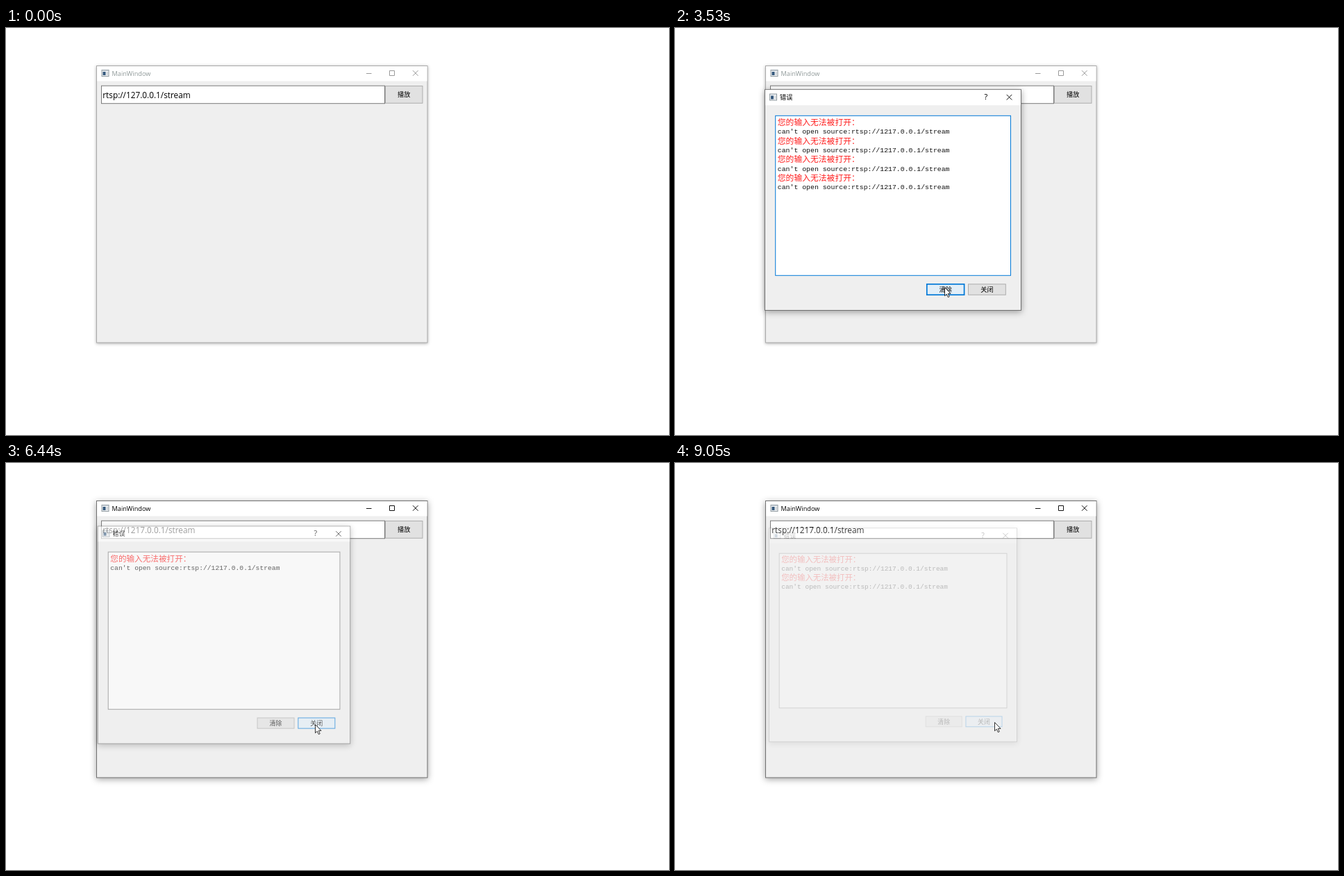
Recreate the animation shown at these times as an HTML page. Size 955 by 586 pixels, loop 9120 ms.

```html
<!DOCTYPE html>
<html lang="zh">
<head>
<meta charset="utf-8">
<style>
html, body { margin: 0; width: 100%; height: 100%; overflow: hidden; background: #fff; }
svg { display: block; width: 955px; height: 586px; }
text { font-family: "Noto Sans CJK SC", "Noto Sans CJK", sans-serif; font-size: 9.2px; white-space: pre; }
.latin { font-family: "Open Sans", "Noto Sans", sans-serif; }
.url { font-size: 11.8px; }
.log { font-family: "Liberation Mono", monospace; font-size: 9.84px; fill: #111; }
.warn { font-family: "Noto Sans CJK SC", "Noto Sans CJK", sans-serif; font-size: 11.8px; font-weight: 300; fill: #ff2020; }
.frame { fill: #efefef; stroke: #aaa; filter: drop-shadow(0 1px 2px rgba(0,0,0,.32)); }
.active .frame { stroke: #707070; filter: drop-shadow(0 2px 5px rgba(0,0,0,.36)); }
.title { fill: #8f9999; }
.glyphs { fill: none; stroke: #999; }
.active .title { fill: #000; }
.active .glyphs { stroke: #111; }
.field { fill: #fff; stroke: #7a7a7a; }
.field.hover { stroke: #171717; }
.field.focus { stroke: #0078d7; }
.button rect { fill: #e1e1e1; stroke: #adadad; }
.button text { text-anchor: middle; }
.button.default rect { stroke: #0078d7; stroke-width: 1.7; }
.button.hover rect { fill: #e1eef8; stroke: #0078d7; }
.button.pressed rect { fill: #cce4f7; stroke: #005499; }
.button.fading rect { fill: #dce1e7; stroke: #8e9fb0; }
</style>
</head>
<body>
<svg viewBox="0 0 955 586">
  <defs>
    <g id="icon">
      <rect x=".5" y=".5" width="10" height="9" fill="#f4f6f8" stroke="#8d979d"/>
      <path d="M1 1.2h9" stroke="#b9c3ca"/>
      <rect x="2" y="3" width="4" height="5" fill="#35587c"/>
      <rect x="7" y="3" width="2.5" height="5" fill="#d5dade"/>
    </g>
  </defs>
  <g id="main">
    <rect class="frame" x="130.5" y="54.5" width="476.5" height="398.5"/>
    <rect x="131" y="55" width="475.5" height="21.5" fill="#fff"/>
    <use href="#icon" x="137.5" y="60"/>
    <text class="title latin" x="152.5" y="68.5">MainWindow</text>
    <path class="glyphs" d="M519 65.5h7.5M552.5 61.5h7v7h-7zM586 61.2l7.6 7.6M593.6 61.2l-7.6 7.6"/>
    <rect id="field" class="field" x="137.5" y="83.2" width="408" height="25.5"/>
    <text id="url" class="latin url" x="139.3" y="101"></text>
    <path id="caret" d="M194.3 89v15.5" stroke="#000"/>
  </g>
  <g id="dialog" class="active">
    <rect class="frame" x="129.5" y="88.7" width="369" height="317.8"/>
    <rect x="130" y="89.2" width="368" height="22" fill="#fff"/>
    <use href="#icon" x="136" y="94.5"/>
    <text class="title" x="151" y="103.2">错误</text>
    <text class="title latin" x="445.6" y="103.3" style="font-size:11px">?</text>
    <path class="glyphs" d="M477.7 95.9l7.6 7.6M485.3 95.9l-7.6 7.6"/>
    <rect id="area" class="field" x="144.7" y="126.3" width="338.8" height="230"/>
    <g id="log"></g>
  </g>
  <circle id="click" r="8.5" fill="#f4f12c" opacity=".68"/>
  <g id="cursor">
    <path id="arrow" d="M.5.5V12.7L3.3 10.2 5.3 14.6 7.2 13.8 5.3 9.4H9z" fill="#fff" stroke="#111" stroke-width=".85"/>
    <path id="beam" d="M-2.5-7h2L0-6.5.5-7h2M0-6.5v13M-2.5 7h2L0 6.5.5 7h2" fill="none" stroke="#111" stroke-width=".9"/>
  </g>
</svg>
<script>
const LOOP = 9120, STEP = 70;
const $ = id => document.getElementById(id);

function add(parent, tag, attrs, content = '') {
  const node = document.createElementNS('http://www.w3.org/2000/svg', tag);
  for (const name in attrs) node.setAttribute(name, attrs[name]);
  node.textContent = content;
  return parent.appendChild(node);
}

function makeButton(parent, label, x, y, width, height) {
  const node = add(parent, 'g', { class: 'button' });
  add(node, 'rect', { x, y, width, height });
  add(node, 'text', { x: x + width / 2, y: y + height / 2 + 3.5 }, label);
  const contains = p => p.x > x && p.x < x + width && p.y > y && p.y < y + height;
  return { node, contains };
}

const play = makeButton($('main'), '播放', 546.5, 83.5, 53.5, 24.7);
const clear = makeButton($('dialog'), '清除', 362.8, 368.8, 53.8, 15.4);
const shut = makeButton($('dialog'), '关闭', 422.5, 368.8, 53.8, 15.4);

const entries = Array.from({ length: 4 }, (_, i) => {
  const entry = add($('log'), 'g', {});
  add(entry, 'text', { class: 'warn', x: 147.8, y: 140 + i * 26.6 }, '您的输入无法被打开：');
  add(entry, 'text', { class: 'log', x: 147.8, y: 152.3 + i * 26.6 }, "can't open source:rtsp://1217.0.0.1/stream");
  return entry;
});

const starts = [0, 130, 1170, 1790, 2140, 3120, 4080, 5050, 5970, 6930, 7130, 7890, 8840];
const presses = [1170, 2210, 3540, 4570, 5190, 6250, 6860, 8840];
const sessions = [
  { open: 2490, close: 4710, errors: 4, blur: 3540 },
  { open: 5470, close: 6390, errors: 1, blur: 6250 },
  { open: 7200, close: 8980, errors: 2, blur: 8840 }
];
const CLEARED = 3610, TYPED = 1500;
const path = [
  [130, 786, 526], [900, 188, 98], [1520, 188, 98], [1790, 497, 126],
  [2070, 570, 98], [2420, 570, 98], [2560, 564, 134], [3050, 430, 345],
  [3400, 388, 373], [4080, 388, 373], [4430, 445, 378], [4710, 445, 378],
  [5050, 566, 97], [5400, 566, 97], [5540, 560, 146], [5900, 446, 370],
  [6250, 445, 376], [6400, 445, 376], [6790, 566, 98], [7000, 566, 98],
  [7130, 561, 119], [7600, 480, 300], [8510, 460, 373], [LOOP, 460, 373]
];

function snap(t) {
  const start = starts.findLast(s => s <= t);
  return start ? start + Math.floor((t - start) / STEP) * STEP : 0;
}

function cursorAt(t) {
  const i = Math.max(1, path.findIndex(key => key[0] > t));
  const [t0, x0, y0] = path[i - 1], [t1, x1, y1] = path[i];
  const u = Math.max(0, (t - t0) / (t1 - t0)), k = u * u * (3 - 2 * u);
  return { x: x0 + (x1 - x0) * k, y: y0 + (y1 - y0) * k };
}

// Opacity and scale while the dialog pops up or fades away.
function dialogPose(t, { open, close }) {
  const rising = [[.4, .965], [.8, .99]][(t - open) / STEP | 0];
  const falling = t >= close && [[.62, .985], [.23, .9675]][(t - close) / STEP | 0];
  return falling || rising || [1, 1];
}

const show = (node, visible) => { node.style.display = visible ? '' : 'none'; };

function draw(time) {
  const t = snap(time);
  const p = cursorAt(t);
  const pressed = presses.some(at => t >= at && t < at + 140);
  const session = sessions.find(s => t >= s.open && t < s.close + 140);
  const modal = session && t < session.close;
  const overField = !modal && t >= 130 && p.x > 137 && p.x < 545 && p.y > 83 && p.y < 109;
  const focused = t >= 1170 && t < 2210;

  $('main').classList.toggle('active', t >= 1170 && !modal);
  $('field').setAttribute('class', 'field' + (focused ? ' focus' : overField ? ' hover' : ''));
  $('url').textContent = t < TYPED ? 'rtsp://127.0.0.1/stream' : 'rtsp://1217.0.0.1/stream';
  show($('caret'), focused);
  $('caret').setAttribute('transform', `translate(${t < TYPED ? -6.7 : 0})`);

  const state = button => !button.contains(p) ? '' : pressed ? ' pressed' : ' hover';
  const opening = modal && t < session.open + 140;
  play.node.setAttribute('class', 'button' + (opening ? ' fading' : modal ? '' : state(play)));

  show($('dialog'), session);
  if (session) {
    const [opacity, scale] = dialogPose(t, session);
    $('dialog').setAttribute('opacity', opacity);
    $('dialog').setAttribute('transform', `translate(313.7 247.3) scale(${scale}) translate(-313.7 -247.3)`);
    const fresh = t < session.blur;
    const count = session === sessions[0] && t >= CLEARED ? 0 : session.errors;
    entries.forEach((entry, i) => show(entry, i < count));
    $('area').setAttribute('class', 'field' + (fresh ? ' focus' : ''));
    const clearDefault = fresh || (session === sessions[0] && t < 4430);
    clear.node.setAttribute('class', 'button' + (clearDefault ? ' default' : '') + state(clear));
    shut.node.setAttribute('class', 'button' + (shut.contains(p) ? ' hover' : ''));
  }

  show($('click'), pressed);
  $('click').setAttribute('cx', p.x);
  $('click').setAttribute('cy', p.y + 1);
  show($('cursor'), t >= 130);
  $('cursor').setAttribute('transform', `translate(${p.x} ${p.y})`);
  show($('arrow'), !overField);
  show($('beam'), overField);
}

const began = performance.now();
function tick() {
  draw((performance.now() - began) % LOOP);
  requestAnimationFrame(tick);
}
tick();
</script>
</body>
</html>
```
